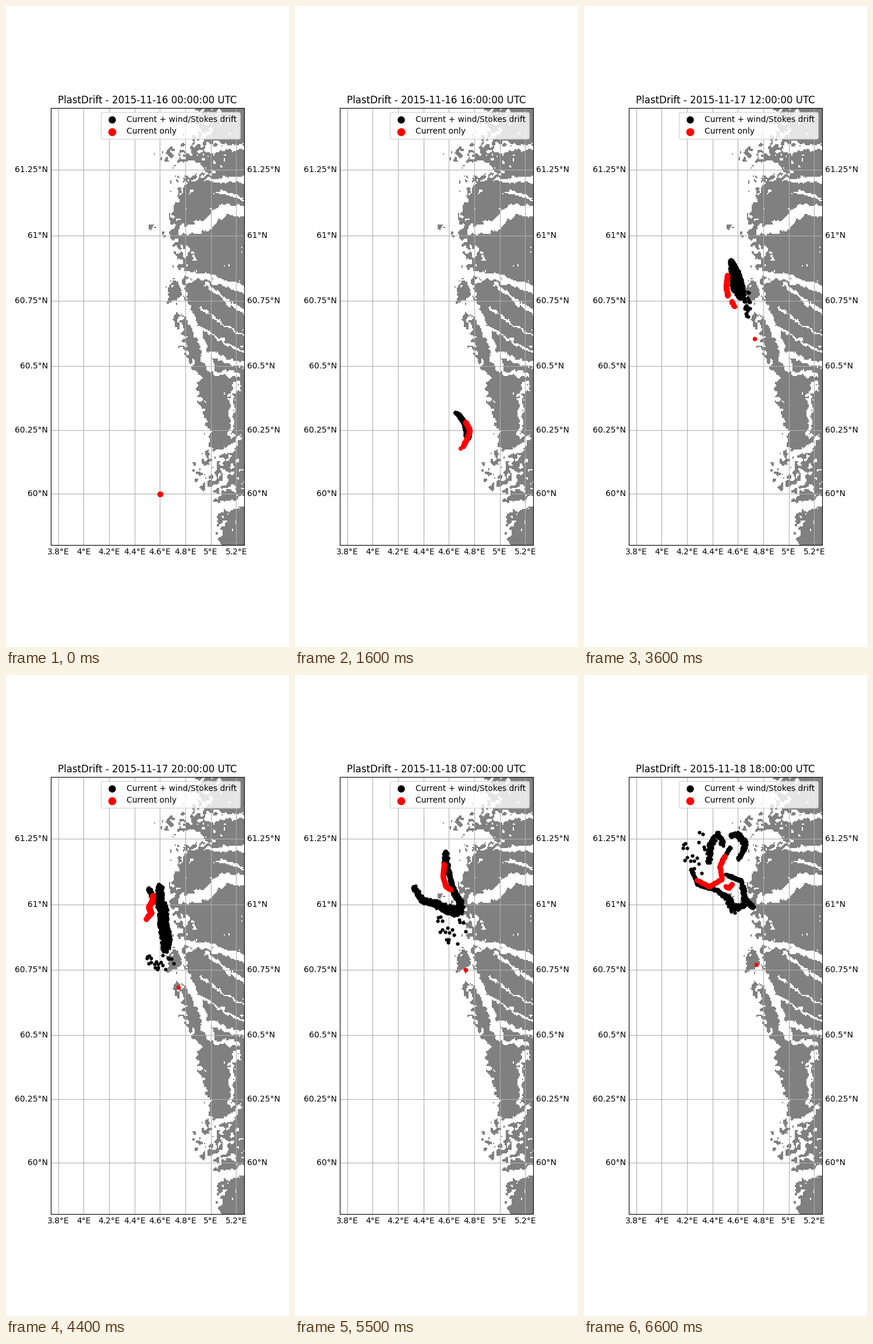
A matplotlib script for the animation above (6.7 s loop, 486x1100 px).

```python
import numpy as np
import matplotlib.pyplot as plt
from matplotlib.animation import FuncAnimation

W, H, DPI = 486, 1100, 100
LEFT, RIGHT, TOP, BOTTOM = 77, 409, 175, 925
HOURS = 67
SCALE = 12502  # pixels per radian of longitude
rng = np.random.RandomState(7)


def px(lon):
    return 264.34 + SCALE * np.radians(lon - 4.6)


def mercator(lat):
    return np.log(np.tan(np.pi / 4 + np.radians(lat) / 2))


def py(lat):
    return 837.45 - SCALE * (mercator(lat) - mercator(60))


# ---------------------------------------------------------------- coast
NX, NY = 166, 375
gx, gy = np.meshgrid(LEFT + 2 * np.arange(NX) + 1, TOP + 2 * np.arange(NY) + 1)


def noise(blur):
    n = rng.randn(NY, NX)
    for _ in range(blur):
        n = (2 * n + np.roll(n, 1, 0) + np.roll(n, -1, 0)
             + np.roll(n, 1, 1) + np.roll(n, -1, 1)) / 6
    return n / n.std()


wx = gx + 2 * noise(8) + 0.8 * noise(1)
wy = gy + 2 * noise(8) + 0.8 * noise(1)
grain = noise(3)

# y, x of the shore, and how far inland the skerries turn into firm land
shore = np.array([
    (175, 350, 22), (228, 332, 25), (258, 300, 45), (285, 322, 25),
    (318, 298, 14), (350, 286, 7), (398, 278, 7), (416, 304, 14),
    (452, 304, 14), (485, 304, 6), (545, 303, 3), (590, 304, 3),
    (635, 332, 5), (690, 336, 4), (760, 349, 4), (785, 370, 42),
    (825, 370, 42), (842, 361, 5), (880, 368, 6), (925, 361, 5)])
coast, reach = (np.interp(wy, shore[:, 0], shore[:, i]) for i in (1, 2))
firm = np.minimum((wx - coast) / reach, 2.5)
for x, y, rx, ry, top in ((287, 492, 10, 13, 3), (250, 376, 8, 15, .1),
                          (263, 398, 7, 13, .1), (293, 535, 7, 25, .8)):
    firm = np.maximum(firm, top - 2 * (((wx - x) / rx) ** 2 + ((wy - y) / ry) ** 2))
land = (firm + grain > 0) & (firm > -1.2)


def sound(width, *xy):
    """Open water along a line."""
    global land
    pts = np.reshape(xy, (-1, 2)).astype(float)
    for a, b in zip(pts[:-1], pts[1:]):
        d = b - a
        t = np.clip(((wx - a[0]) * d[0] + (wy - a[1]) * d[1]) / (d @ d), 0, 1)
        land &= np.hypot(wx - a[0] - t * d[0], wy - a[1] - t * d[1]) > width / 2


sound(9, 345, 246, 415, 244)
sound(22, 305, 279, 328, 279)
sound(8, 345, 297, 415, 298)
sound(5, 358, 316, 409, 332)
sound(18, 305, 386, 345, 374, 374, 350, 415, 353)
sound(11, 290, 460, 345, 465, 415, 487)
sound(6, 345, 478, 372, 504, 415, 526)
sound(4, 335, 519, 357, 538, 409, 568)
sound(5, 334, 552, 350, 564, 409, 596)
sound(9, 335, 590, 360, 602, 409, 618)
sound(7, 345, 608, 358, 630, 400, 632)
sound(14, 299, 505, 322, 545, 340, 590, 350, 622)
sound(7, 400, 645, 385, 665, 386, 735)
sound(8, 360, 770, 391, 760, 398, 740)
sound(16, 355, 863, 415, 850)

# ---------------------------------------------------------------- particles
N_BLACK, N_RED, STRAYS = 640, 320, 22


def disc(n):
    r, a = np.sqrt(rng.rand(n)), 2 * np.pi * rng.rand(n)
    return np.column_stack([r * np.cos(a), r * np.sin(a)])


spread = disc(N_BLACK)
loose = disc(STRAYS)


def swarm(n, strands):
    """Spread n particles along strands of (x, y, radius) points."""
    strands = [np.array(s, float) for s in strands]
    runs = [np.r_[0, np.cumsum(np.hypot(*np.diff(s[:, :2], axis=0).T))] + 0.0
            for s in strands]
    total = np.cumsum([r[-1] + 1e-6 for r in runs])
    ends = np.round(n * total / total[-1]).astype(int)
    out, start = [], 0
    for s, run, end in zip(strands, runs, ends):
        u = np.linspace(0, run[-1], end - start)
        x, y, r = (np.interp(u, run, s[:, i]) for i in range(3))
        out.append(np.column_stack([x, y]) + r[:, None] * spread[start:end])
        start = end
    return np.vstack(out)


times, black_keys, red_keys = [], [], []


def pose(hour, black, stray, red, lone):
    """Add key positions; stray is the centre and half-size of the loose dots."""
    times.append(hour)
    cx, cy, sx, sy = stray
    black_keys.append(np.vstack([swarm(N_BLACK, black), loose * (sx, sy) + (cx, cy)]))
    red_keys.append(np.vstack([swarm(N_RED, red), [lone]]))


pose(0, [[(264.3, 837.5, .5)] * 2], (264.3, 837.5, .5, .5),
     [[(264.3, 837.5, .7)] * 2], (264.3, 837.5))
pose(8, [[(265, 776, .6), (271, 775, 2), (275, 795, 2), (279, 805, 2)]],
     (277, 800, 2, 4),
     [[(277, 782, 1), (282, 794, 1.5), (278, 807, 1)]], (278, 807))
pose(24, [[(280, 604, .6), (284, 613, 2.5), (299, 626, 4), (306, 652, 5)]],
     (304, 655, 5, 6),
     [[(295, 629, 1.5), (303, 644, 1.5), (289, 680, 1)]], (287, 695))
pose(36, [[(252, 437, 3), (259, 458, 8), (263, 480, 11), (270, 497, 7)]],
     (280, 512, 6, 24),
     [[(246, 462, 1.4), (244, 482, 1.4), (247, 497, 1.4)],
      [(253, 507, 1), (258, 515, 1)]], (293, 571))
pose(44, [[(245, 367, 3), (250, 377, 3)],
          [(264, 363, 5), (263, 385, 7), (269, 404, 9), (269, 425, 8),
           (275, 452, 9), (274, 470, 7)]],
     (264, 490, 27, 18),
     [[(252, 378, 2), (251, 390, 2), (245, 397, 2), (249, 408, 2), (240, 419, 1)]],
     (296, 536))
pose(55, [[(259, 303, 3), (258, 320, 6), (266, 348, 2), (274, 375, 4),
           (284, 392, 6), (280, 406, 8), (262, 402, 8), (240, 392, 6),
           (218, 386, 4), (204, 364, 4)]],
     (268, 430, 28, 36),
     [[(256, 324, 1), (254, 346, 1), (259, 363, 1), (267, 368, 1)]], (293, 506))
pose(66, [[(214, 320, 4), (216, 293, 5), (229, 271, 4), (238, 290, 4)],
          [(250, 276, 3), (264, 273, 4), (278, 291, 5), (265, 316, 2)],
          [(251, 295, 1.5), (236, 320, 1.5)],
          [(244, 343, 2), (270, 353, 3), (276, 385, 4), (290, 398, 3)],
          [(275, 394, 4), (257, 402, 7), (246, 382, 5), (228, 369, 2),
           (195, 359, 2), (184, 334, 1)]],
     (192, 306, 27, 40),
     [[(242, 310, 1), (233, 328, 1), (237, 350, 1), (215, 363, 1), (194, 352, 1)],
      [(243, 363, 1), (248, 366, 1), (254, 358, 1)]], (296, 497))
times = np.array(times, float)


def glide(keys, t):
    """Smooth path through the key positions at hour t."""
    slope = np.gradient(np.stack(keys), times, axis=0)
    i = min(np.searchsorted(times, t, side="right") - 1, len(times) - 2)
    h = times[i + 1] - times[i]
    s = (t - times[i]) / h
    return ((1 + 2 * s) * (1 - s) ** 2 * keys[i] + s * (1 - s) ** 2 * h * slope[i]
            + s * s * (3 - 2 * s) * keys[i + 1] + s * s * (s - 1) * h * slope[i + 1])


# ---------------------------------------------------------------- figure
plt.rcParams["font.family"] = "DejaVu Sans"
fig = plt.figure(figsize=(W / DPI, H / DPI), dpi=DPI, facecolor="white")
ax = fig.add_axes([LEFT / W, 1 - BOTTOM / H, (RIGHT - LEFT) / W, (BOTTOM - TOP) / H])
shade = np.where(land, 128 / 255, 1.0)
ax.imshow(np.dstack([shade] * 3), extent=(LEFT, RIGHT, BOTTOM, TOP),
          interpolation="nearest", aspect="auto", zorder=0)

for lon in 3.8 + 0.2 * np.arange(8):
    ax.axvline(px(lon), color="#b0b0b0", lw=0.8, zorder=2)
    ax.text(px(lon), BOTTOM + 5, f"{round(lon, 1):g}°E", ha="center", va="top")
for lat in 60 + 0.25 * np.arange(6):
    ax.axhline(py(lat), color="#b0b0b0", lw=0.8, zorder=2)
    for x, side in ((LEFT - 5, "right"), (RIGHT + 5, "left")):
        ax.text(x, py(lat), f"{lat:g}°N", ha=side, va="center")

black = ax.scatter([], [], s=20, c="black", linewidths=0, zorder=10,
                   label="Current + wind/Stokes drift")
reds = ax.scatter([], [], s=20, c="red", linewidths=0.9, zorder=11,
                  label="Current only")
ax.legend(loc="upper right", markerscale=2)
ax.set(xlim=(LEFT, RIGHT), ylim=(BOTTOM, TOP), xticks=[], yticks=[])
title = ax.set_title("", fontsize=12)


def draw(hour):
    black.set_offsets(glide(black_keys, hour))
    reds.set_offsets(glide(red_keys, hour))
    title.set_text(f"PlastDrift - 2015-11-{16 + hour // 24} {hour % 24:02d}:00:00 UTC")
    return black, reds, title


anim = FuncAnimation(fig, draw, frames=HOURS, interval=100, repeat=True,
                     repeat_delay=0, init_func=lambda: draw(0))
plt.show()
```
